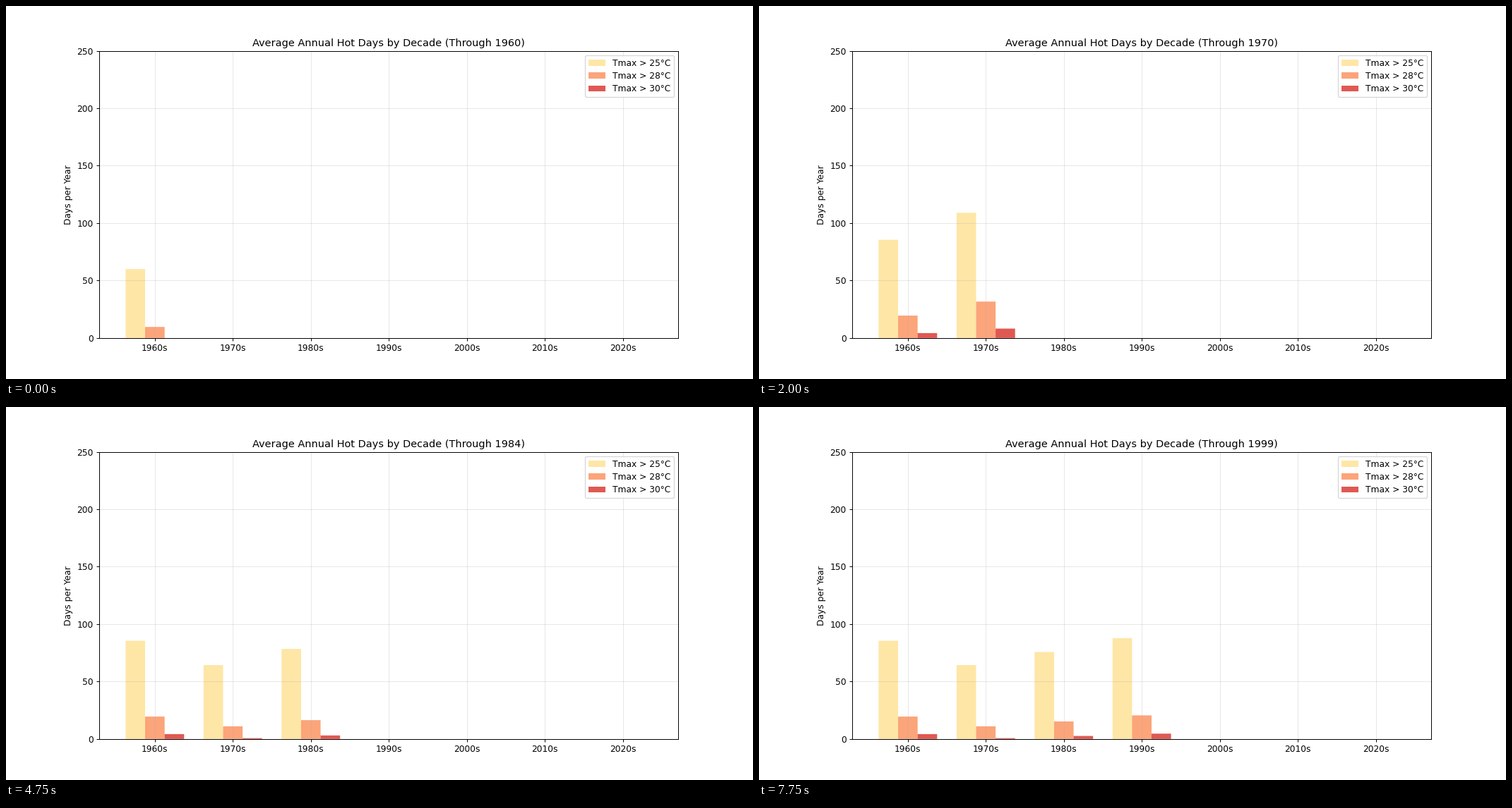
Write a matplotlib script that moves like this. It is 1058x529 px and loops after 8000 ms.

```python
import matplotlib.pyplot as plt
import numpy as np
from matplotlib.animation import FuncAnimation

plt.rcParams["font.family"] = "DejaVu Sans"

FRAMES, INTERVAL = 32, 250
WIDTH = 0.25
DECADES = range(1960, 2021, 10)
COLORS = {25: "#fee090", 28: "#fc8d59", 30: "#d73027"}

# Warm days in the opening year of a decade, and the mean over all of it.
WARM_DAYS = {1960: (60, 85.5), 1970: (109, 64.3),
             1980: (100, 75.7), 1990: (96, 87.8)}


def warm_mean(decade, year):
    """Running mean of a decade, settling as 1/n from its opening year."""
    n = min(year - decade + 1, 10)
    if n < 1 or decade not in WARM_DAYS:
        return 0
    first, mean = WARM_DAYS[decade]
    return mean + (first - mean) * (10 / n - 1) / 9


def hot_days(warm):
    """Days above each threshold; hotter days grow from the warm ones."""
    return warm, warm ** 2 / 375, max(0, (warm - 60) / 6)


fig, ax = plt.subplots(figsize=(12, 6), dpi=1058 / 12)
fig.subplots_adjust(left=0.1249, top=0.8798)
x = np.arange(len(DECADES))
groups = [
    ax.bar(x + (k - 1) * WIDTH, np.zeros(len(x)), WIDTH, color=color,
           alpha=0.8, snap=False, label=f"Tmax > {limit}°C")
    for k, (limit, color) in enumerate(COLORS.items())
]
ax.set_xticks(x, [f"{decade}s" for decade in DECADES])
ax.set_xlim(-0.7125, 6.7125)
ax.set_ylim(0, 250)
ax.set_ylabel("Days per Year")
ax.grid(True, alpha=0.3)
ax.legend(loc="upper right", labelspacing=0.43)
title = ax.set_title("", fontsize=11.85, pad=5.4)


def update(frame):
    year = 1960 + int(frame * 1.28)
    title.set_text(f"Average Annual Hot Days by Decade (Through {year})")
    for decade, *bars in zip(DECADES, *groups):
        for bar, days in zip(bars, hot_days(warm_mean(decade, year))):
            bar.set_height(days)
    return [title, *(bar for bars in groups for bar in bars)]


anim = FuncAnimation(fig, update, frames=FRAMES, interval=INTERVAL,
                     init_func=lambda: update(0), repeat=True, repeat_delay=0)
plt.show()
```
